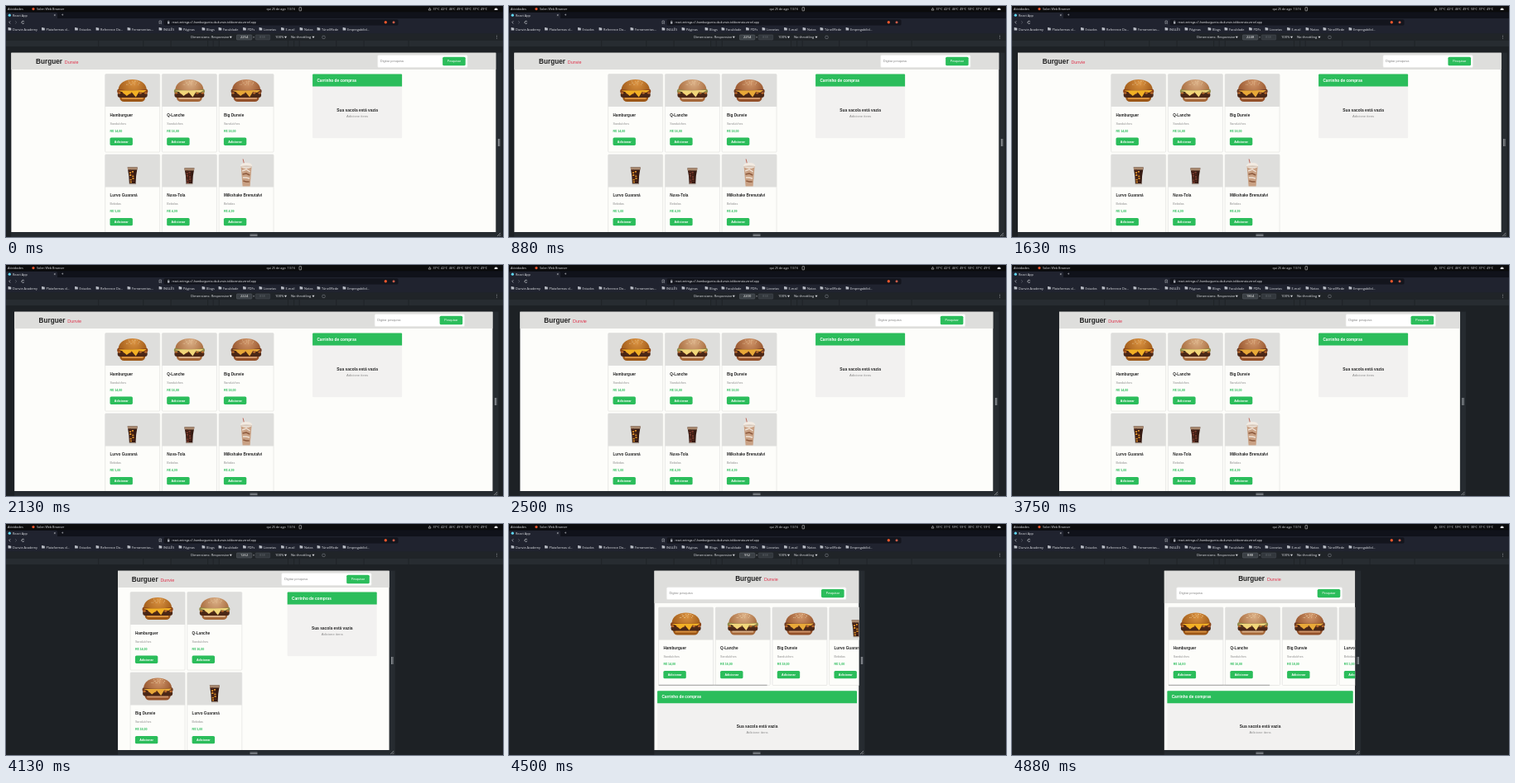
Animation, 600 px wide and 280 px high, one loop 5.01 s. Source, as an HTML page with a canvas:

```html
<!DOCTYPE html>
<html lang="pt">
<head>
<meta charset="utf-8">
<style>
html, body { margin: 0; width: 100%; height: 100%; overflow: hidden; background: #1d2125; }
canvas { display: block; width: 600px; height: 280px; }
</style>
</head>
<body>
<canvas id="stage"></canvas>
<script>
const LOOP = 5010, SCALE = 0.2597, MID = 298.9, TOP = 56.5, BOTTOM = 274;
const GREEN = '#2bbd5b', GREY = '#8c8c8c', INK = '#252525', PAPER = '#fdfdfa';
const SANS = '"Liberation Sans", sans-serif', UI = '"Open Sans", sans-serif';

// [time, viewport width]
const SIZES = [[0, 2254], [1630, 2248], [1750, 2242], [1880, 2236], [2130, 2224], [2380, 2208],
  [2500, 2200], [2750, 2170], [3000, 2124], [3250, 2060], [3380, 2018], [3630, 1926], [3750, 1864],
  [3880, 1700], [4000, 1480], [4130, 1262], [4250, 1120], [4380, 1020], [4500, 952], [4630, 910], [4880, 888]];

const PRODUCTS = [
  ['Hamburguer', 'Sanduíches', '14,00', () => burger('#d9913f', '#9c5717', '#8a4317', '#f2b024')],
  ['Q-Lanche', 'Sanduíches', '16,00', () => burger('#d9ad84', '#a5683a', '#8f8a4a', '#f1d67a')],
  ['Big Dunvie', 'Sanduíches', '18,00', () => burger('#cf9468', '#93512a', '#6d3a22', '#e8a838')],
  ['Lurvo Guaraná', 'Bebidas', '5,00', () => glass('#e0902c', 1)],
  ['Nuva-Tola', 'Bebidas', '4,99', () => glass('#7a3a2c', 0.95)],
  ['Milkshake Brenutalvi', 'Bebidas', '4,99', shake]
];

const BOOKMARKS = [[8, 'Dunvie Academy'], [48.5, 'Plataformas d…'], [88.5, 'Estudos'], [114, 'Reference Do…'],
  [152, 'Ferramentas…'], [190, 'INGLÊS'], [214, 'Páginas'], [242, 'Blogs'], [262, 'Faculdade'], [291.5, 'PDFs'],
  [311, 'Livrarias'], [337.5, 'E-mail'], [360, 'Notas'], [381, 'Túnel/Rede'], [412, 'Empregabilid…']];

const canvas = document.getElementById('stage');
const c = canvas.getContext('2d');
const dpr = window.devicePixelRatio || 1;
canvas.width = 600 * dpr;
canvas.height = 280 * dpr;

function rect(x, y, w, h, fill, r = 0, stroke) {
  c.beginPath();
  c.roundRect(x, y, w, h, r);
  if (fill) { c.fillStyle = fill; c.fill(); }
  if (stroke) { c.strokeStyle = stroke; c.lineWidth = 0.6; c.stroke(); }
}
function oval(x, y, rx, ry, fill) {
  c.beginPath();
  c.ellipse(x, y, rx, ry, 0, 0, 7);
  c.fillStyle = fill;
  c.fill();
}
function shape(points, fill) {
  c.beginPath();
  points.forEach(p => c.lineTo(...p));
  c.fillStyle = fill;
  c.fill();
}
function line(points, color, width = 0.7) {
  c.beginPath();
  points.forEach(p => c.lineTo(...p));
  c.strokeStyle = color;
  c.lineWidth = width;
  c.stroke();
}
function text(s, x, y, size, color, { bold, font = SANS, align = 'left' } = {}) {
  c.font = `${bold ? 'bold ' : ''}${size}px ${font}`;
  c.textAlign = align;
  c.fillStyle = color;
  c.fillText(s, x, y);
}
const ui = (s, x, y, size = 3.9, color = '#e2e4e8') => text(s, x, y, size, color, { font: UI });
function at(x, y, draw) {
  c.save();
  c.translate(x, y);
  draw();
  c.restore();
}

// Food is drawn around the middle of the card's picture, top at y = 0
function burger(light, dark, filling, cheese) {
  const bun = c.createRadialGradient(2, 10, 1, 0, 14, 19);
  bun.addColorStop(0, light);
  bun.addColorStop(1, dark);
  rect(-15.5, 26.5, 31, 7, dark, [2, 2, 6, 6]);
  rect(-13, 28, 26, 2.5, light, 1);
  rect(-18, 22, 36, 6.4, '#4b2716', 3);
  rect(-18.5, 18, 37, 5.5, filling, 2.5);
  for (let i = -5; i < 6; i++) oval(i * 3.2, 22 + i * i % 4, 1.6, 1.2, i % 2 ? '#b8682b' : '#33180f');
  shape([[-17, 20], [17, 19.5], [13, 22.5], [8, 21.5], [4, 28], [-1, 22], [-7, 26.5], [-12, 22]], cheese);
  c.beginPath();
  c.moveTo(-17, 18.5);
  c.bezierCurveTo(-16, 2.5, 16, 2.5, 17, 18.5);
  c.quadraticCurveTo(0, 21, -17, 18.5);
  c.fillStyle = bun;
  c.fill();
  for (let i = 0; i < 18; i++) oval(Math.sin(i * 2.4) * (3 + i * 0.5), 8.5 + i * 4 % 6, 0.6, 0.4, '#ecd3a8');
}
function glass(tint, k) {
  const top = 36 - 20.5 * k;
  shape([[-6, top], [6, top], [4.4, 26], [3.8, 36], [-3.8, 36], [-4.4, 26]], '#351a12');
  shape([[-6, top], [6, top], [5.6, top + 3], [-5.6, top + 3]], '#a9896f');
  for (let i = 0; i < 11; i++)
    rect(-4 + i * 3.1 % 6, top + 3 + i * 1.4 * k, 2.2, 1.8, i % 3 ? tint : '#552719', 0.5);
  rect(-3.8, 35, 7.6, 1.2, '#a6998d', 0.5);
}
function shake() {
  line([[-2, 14], [-4, 5.5]], '#c26a5a', 1);
  shape([[-6.5, 14], [6.5, 14], [4.5, 38.5], [-4.5, 38.5]], '#c9a184');
  oval(0, 13.5, 7, 3.6, '#f3ebe2');
  oval(0, 14.5, 7.2, 1.2, '#d9cabd');
  for (let i = 0; i < 4; i++)
    line([[-5 + i * 0.4, 20 + i * 4], [0, 18 + i * 5], [4.5 - i * 0.3, 21 + i * 4]], i % 2 ? '#8d5a3d' : '#efe2d6', 1.4);
}

function button(label, x, y, w, h, bold) {
  rect(x, y, w, h, GREEN, 1.6);
  text(label, x + w / 2, y + h / 2 + 1.3, 3.64, '#fff', { bold, align: 'center' });
}

function card([name, kind, price, draw], x, y) {
  rect(x, y, 66, 94.5, PAPER, 1, '#dcdcda');
  rect(x, y, 66, 39.5, '#dededc', [1, 1, 0, 0]);
  at(x + 33, y, draw);
  text(name, x + 5.8, y + 51, 4.68, INK, { bold: true });
  text(kind, x + 5.8, y + 61, 3.7, GREY);
  text('R$ ' + price, x + 5.8, y + 70.4, 3.64, GREEN, { bold: true });
  button('Adicionar', x + 5.8, y + 76.9, 27.4, 9.4, true);
}

function cart(x, y, w, h) {
  rect(x, y, w, h, '#f2f1f0', 1);
  rect(x, y, w, 15, GREEN, [1, 1, 0, 0]);
  text('Carrinho de compras', x + 5.3, y + 9.1, 4.75, '#fff', { bold: true });
  text('Sua sacola está vazia', x + w / 2, y + 45, 4.85, INK, { bold: true, align: 'center' });
  text('Adicione itens', x + w / 2, y + 52, 4.2, GREY, { align: 'center' });
}

function search(x, y, w, h) {
  rect(x, y, w, h, '#fff', 1.5, '#e9e9e8');
  text('Digitar pesquisa', x + 3.2, y + h / 2 + 1.3, 3.95, '#858585');
  button('Pesquisar', x + w - 30, y + 2.2, 27.6, h - 4.4);
}

function logo(x, y) {
  text('Burguer', x, y, 8.2, '#222', { bold: true });
  text('Dunvie', x + 34.7, y, 5.4, '#e0334c');
}

function page(width) {
  const w = width * SCALE, left = MID - w / 2, right = left + w, narrow = width < 1000;
  rect(right, TOP, 7, 223.5, '#262b30');
  rect(left, BOTTOM, w + 7, 6, '#262b30');
  c.save();
  c.beginPath();
  c.rect(left, TOP, w, BOTTOM - TOP);
  c.clip();
  rect(left, TOP, w, BOTTOM - TOP, PAPER);
  rect(left, TOP, w, narrow ? 39.5 : 20.5, '#dededc');
  if (narrow) {
    logo(MID - 25.7, 69.2);
    search(left + 15, 76.8, w - 30.5, 14.6);
    PRODUCTS.forEach((p, i) => card(p, left + 5.3 + i * 68.7, 101));
    line([[left + 5.3, 195.3], [left + 5.3 + w * 0.53, 195.3]], '#8a8a8a', 0.8);
    cart(left + 3.8, 202.3, w - 6.3, 78);
  } else {
    logo(left + w * 0.051, 70);
    search(right - w * 0.05 - 113.7, 59.5, 108.5, 15);
    const x = Math.max(MID - 179.2, left + w * 0.046), cartX = 2 * MID - x - 108;
    const cols = Math.min(3, Math.floor((cartX - x) / 68.7));
    PRODUCTS.forEach((p, i) => card(p, x + i % cols * 68.7, 82.6 + Math.floor(i / cols) * 97.4));
    cart(cartX, 82.6, 108, 77.6);
  }
  c.restore();
  for (const d of [2.8, 4.2]) line([[right + d, 161], [right + d, 170]], '#a9adb1', 0.8);
  for (const d of [277, 278.4]) line([[294.5, d], [303.5, d]], '#a9adb1', 0.8);
  line([[right + 1.5, 279], [right + 5.5, 275]], '#a9adb1');
  line([[right + 3.8, 279], [right + 5.5, 277.3]], '#a9adb1');
}

function browser(width, hot) {
  // System bar
  rect(0, 0, 600, 7.5, '#0b0b0c');
  ui('Atividades', 2, 5, 3.95);
  oval(33, 3.6, 1.6, 1.6, '#e8542c');
  ui('Solen Web Browser', 37, 5, 3.7);
  ui('qui 25 de ago  13:16', 314.5, 5, 3.7);
  rect(354, 1.6, 2.6, 4.2, null, 0.5, '#ccc');
  line([[510, 5], [511.5, 2.2], [513, 5], [510, 5]], '#ccc', 0.6);
  const temps = hot ? [33, 31, 59, 59, 30, 31, 59] : [37, 42, 46, 49, 50, 37, 49];
  temps.forEach((t, i) => ui(t + '°C', 515.5 + i * 9.6, 5, 3.6));
  rect(589.5, 2.6, 4.2, 2.4, '#ddd', [2, 2, 0.5, 0.5]);

  // Tab, address and bookmarks
  rect(0, 7.5, 600, 7.5, '#10121a');
  rect(0, 8, 62, 7, '#20232f', [1.5, 1.5, 0, 0]);
  oval(4.3, 11.2, 1.6, 1.6, '#61dafb');
  ui('React App', 8, 12.5, 3.8);
  ui('×', 57.5, 12.6, 4.5);
  ui('+', 66.8, 12.6, 4.8);
  rect(0, 15, 600, 18.5, '#20232f');
  line([[5.3, 18.2], [3.7, 19.8], [5.3, 21.4]], '#c5c8ce');
  line([[11.2, 18.2], [12.8, 19.8], [11.2, 21.4]], '#666b75');
  c.beginPath();
  c.arc(20.5, 19.8, 1.6, 0.5, 5.8);
  c.strokeStyle = '#d6d8dc';
  c.stroke();
  line([[185, 18], [187.4, 18], [187.4, 21.6], [186.2, 20.5], [185, 21.6], [185, 18]], '#c5c8ce', 0.5);
  rect(190.5, 16.2, 283, 7.2, '#13151d', 1.5);
  rect(195, 19.4, 2.4, 2, '#b8bbc2', 0.3);
  rect(195.5, 18, 1.4, 2, null, 0.6, '#b8bbc2');
  ui('react-entrega-s1-hamburgueria-da-dunvie-toldovenzia.vercel.app', 200.5, 21.1, 3.35, '#f0f1f3');
  oval(458.3, 19.8, 1.7, 1.7, '#f0562b');
  oval(468, 19.8, 1.5, 1.5, '#c85a48');
  for (const [x, s] of BOOKMARKS) {
    rect(x - 5.4, 26.6, 3.7, 3, '#b8bcc4', 0.4);
    rect(x - 5.4, 26, 1.7, 1, '#b8bcc4', 0.3);
    ui(s, x, 29.6, 3.85);
  }

  // Device toolbar and breakpoint ruler
  rect(0, 33.5, 600, 8.5, '#202428');
  ui('Dimensions: Responsive', 223, 39.3, 4.1);
  rect(278.5, 35, 18.3, 6, '#3b4045', 0.6, '#565c62');
  ui(String(width), 287.6 - String(width).length * 1.17, 39.3, 4.1, '#fff');
  ui('×', 297.9, 39.3, 3.8);
  rect(301.3, 35, 17.4, 6, '#33383d', 0.6, '#454b51');
  ui('838', 306, 39.3, 4, '#62676d');
  ui('100%', 325, 39.3, 4.1);
  ui('No throttling', 344, 39.3, 4.1);
  for (const x of [271.3, 337.5, 371]) shape([[x - 1.5, 36.8], [x + 1.5, 36.8], [x, 39.2]], '#d6d8dc');
  rect(381.8, 36.2, 3.4, 3.4, null, 1, '#7b8086');
  for (let i = 0; i < 3; i++) oval(592.5, 36 + i * 1.7, 0.45, 0.45, '#c5c8ce');
  rect(0, 42, 600, 7, '#272c31');
  for (const px of [320, 375, 425, 768, 1024, 1440])
    for (const side of [-1, 1]) line([[MID + side * px * 0.13, 42], [MID + side * px * 0.13, 49]], '#1d2125', 0.8);
  rect(0, 49, 600, 231, '#1d2125');
}

function frame(now) {
  const t = now % LOOP;
  const width = SIZES.filter(s => s[0] <= t).pop()[1];
  c.setTransform(dpr, 0, 0, dpr, 0, 0);
  browser(width, t >= 4250);
  page(width);
}
const start = performance.now();
function tick() {
  frame(Math.max(0, performance.now() - start));
  requestAnimationFrame(tick);
}
tick();
</script>
</body>
</html>
```
